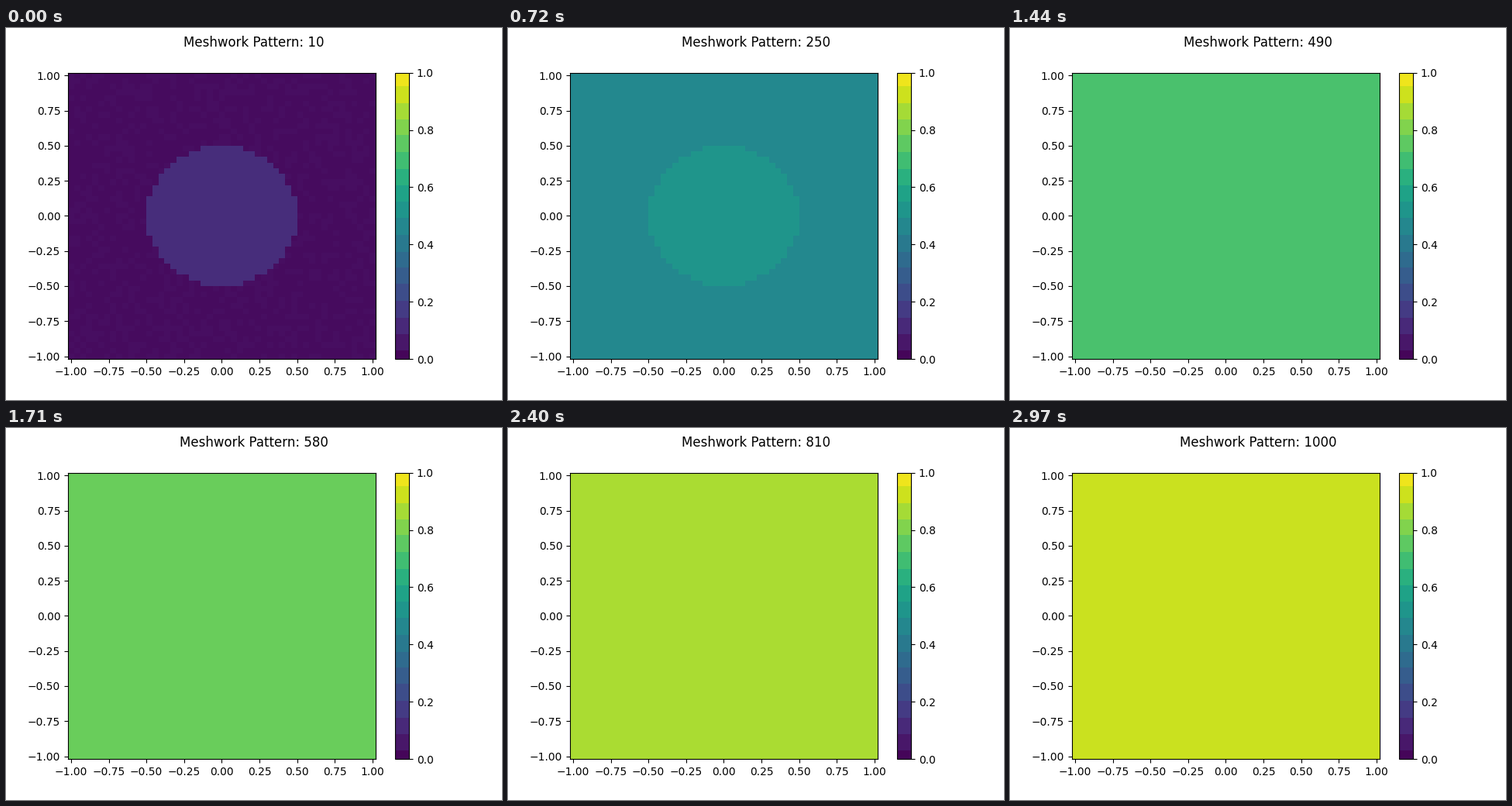
These frames come from a looping animation (640 by 480 pixels, 3000 ms). A matplotlib script:

```python
import numpy as np
import matplotlib.pyplot as plt
from matplotlib.animation import FuncAnimation
from matplotlib.cm import ScalarMappable
from matplotlib.colors import ListedColormap, Normalize

FRAMES = 100
STEP = 10
RATE = 0.0025
SPLIT = 0.0354  # smallest lead over the mean that still gets its own tone
GRAIN = 128     # tone steps of the dark background

axis = np.linspace(-1, 1, 51)
X, Y = np.meshgrid(axis, axis)
disc = X**2 + Y**2 < 0.25
rng = np.random.default_rng(4)
start = 0.01 * rng.random(X.shape) + 0.1 * disc


def field(t):
    """Values relaxing towards 1, flattened to two tones."""
    u = 1 - (1 - start) * np.exp(-RATE * t)
    high = disc & (u - u.mean() > SPLIT)
    out = np.full_like(u, u[~high].mean())
    if high.any():
        out[high] = u[high].mean()
    if t <= 4 * STEP:
        # grain shows only at the dark end
        out[~disc] = (np.floor(u[~disc] * GRAIN) + 0.5) / GRAIN
    return out


def banded(cmap, first, last, count):
    """Even bands of one colour, with shorter ones at both ends."""
    edges = np.concatenate([[0], np.linspace(first, last, count), [1]])
    mids = (edges[:-1] + edges[1:]) / 2
    levels = (np.arange(256) + 0.5) / 256
    return ListedColormap(cmap(mids[np.searchsorted(edges, levels) - 1]))


viridis = plt.get_cmap("viridis")
norm = Normalize(0, 1)

fig, ax = plt.subplots(figsize=(6.4, 4.8), dpi=100)
mesh = ax.pcolormesh(X, Y, field(STEP), cmap=viridis, norm=norm,
                     shading="nearest")
fig.colorbar(ScalarMappable(norm, banded(viridis, 0.03, 0.953, 17)), ax=ax)
title = fig.suptitle("")


def update(i):
    t = STEP * (i + 1)
    mesh.set_array(field(t))
    title.set_text(f"Meshwork Pattern: {t}")
    return mesh, title


anim = FuncAnimation(fig, update, frames=FRAMES, interval=30,
                     repeat=True, repeat_delay=0, blit=False)
plt.show()
```
